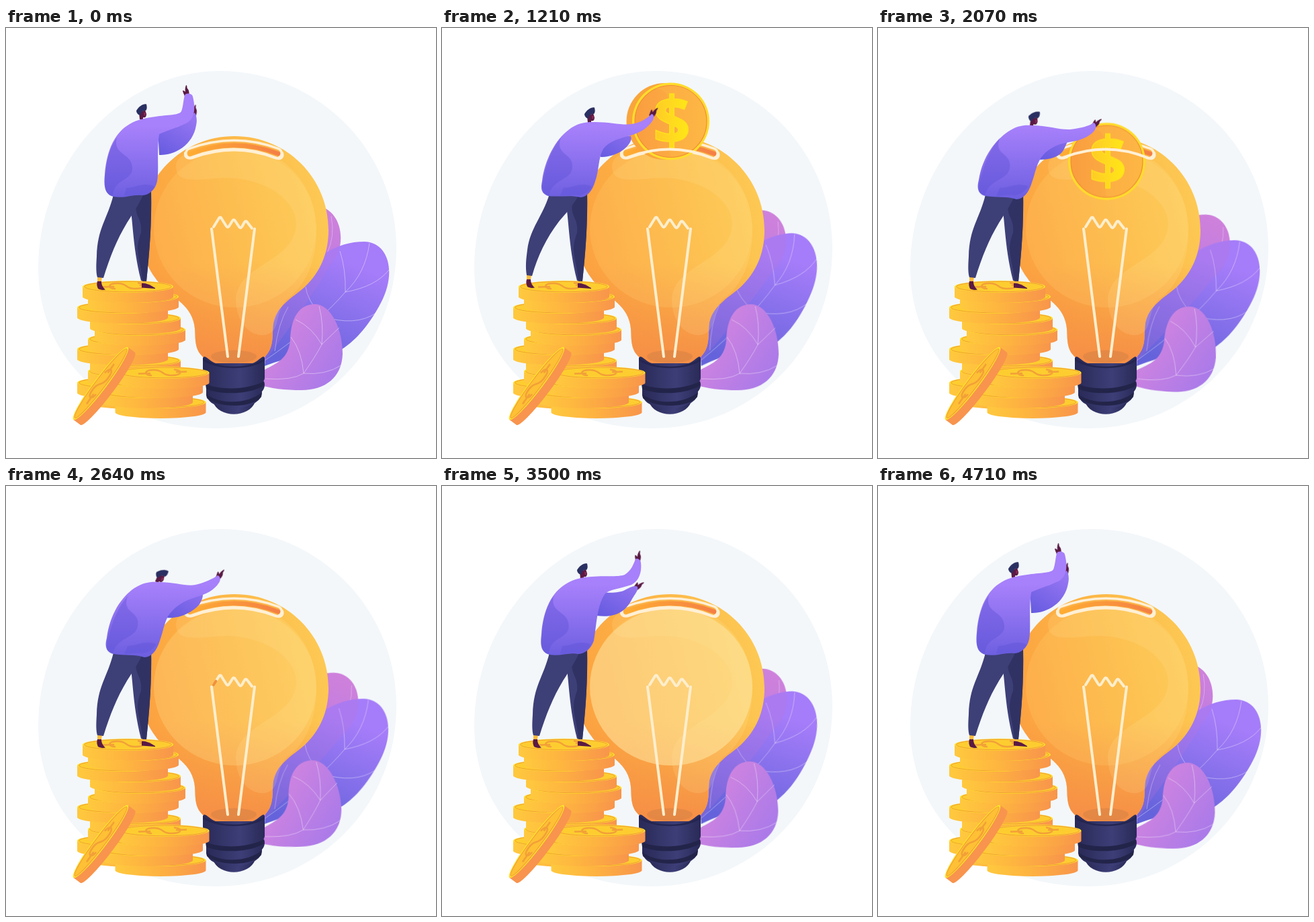
Write an HTML page that moves like this. It is 640 by 640 pixels and loops after 4.78 s.

```html
<!DOCTYPE html>
<html lang="en">
<head>
<meta charset="utf-8">
<title>Investing in an idea</title>
<style>
html, body { margin: 0; width: 100%; height: 100%; overflow: hidden; background: #fff; }
svg { display: block; width: 100vw; height: 100vh; }
svg * { animation: 4.78s linear infinite; }
.vein { fill: none; stroke: #fff; stroke-opacity: .4; stroke-width: 1; }
.wire { fill: none; stroke: #ffeecd; stroke-width: 4; stroke-linecap: round; stroke-linejoin: round; }
.skin { fill: #5a1a44; }

/* Leaves */
.big, .rear, .near { animation-timing-function: cubic-bezier(.37, 0, .63, 1); }
.big { transform-origin: 385px 495px; animation-name: big; animation-duration: 1.195s; animation-direction: alternate; }
.rear { transform-origin: 385px 495px; animation-name: rear; animation-duration: 2.39s; animation-direction: alternate; }
.near { transform-origin: 380px 530px; animation-name: near; animation-duration: 1.195s; animation-direction: alternate; animation-delay: -1.7925s; }
@keyframes big { to { transform: rotate(-5.1deg); } }
@keyframes rear { to { transform: rotate(8.6deg); } }
@keyframes near { from { transform: rotate(-3.4deg); } to { transform: rotate(3.4deg); } }

/* Inserted coin */
.drop { animation-name: drop; }
.rim { animation-name: rim; }
@keyframes drop {
  0%, 2.5% { transform: translateY(-76px); opacity: 0; animation-timing-function: cubic-bezier(.3, .3, .55, 1); }
  5% { opacity: 1; }
  14.5% { transform: none; }
  32.4% { transform: none; animation-timing-function: cubic-bezier(.37, 0, .63, 1); }
  47.5% { opacity: 1; }
  50.2% { transform: translateY(88px); }
  52.5%, 100% { transform: translateY(88px); opacity: 0; }
}
@keyframes rim {
  0%, 32.4% { transform: translateX(-9px); }
  42%, 100% { transform: none; }
}

/* Light */
.glow { animation-name: glow; }
.spark { stroke: #f0913a; stroke-dasharray: 10 200; animation-name: spark; }
@keyframes glow {
  0%, 51% { opacity: .03; }
  55.2% { opacity: .14; }
  66%, 75% { opacity: .46; }
  92%, 100% { opacity: .03; }
}
@keyframes spark {
  0%, 53% { stroke-dashoffset: 10; opacity: 0; }
  53.1% { stroke-dashoffset: 10; opacity: 1; }
  55.2% { stroke-dashoffset: 4; opacity: 1; }
  64% { stroke-dashoffset: -92; opacity: 1; }
  64.1%, 100% { stroke-dashoffset: -92; opacity: 0; }
}

/* Man */
.body { animation-name: body; }
.arm { animation-name: arm; }
.shade { transform-origin: 0 250px; animation-name: shade; }
.head { animation-name: head; }
.hand { animation-name: hand; }
.hand2 { animation-name: hand2; }
.leg { animation-name: leg; }
.foot { animation-name: foot; }
@keyframes body {
  0%, 100% { d: path("M160 251C148 248 145 238 147 218C150 180 163 155 184 143C196 136 208 134 222 132C240 129 258 130 261 124C264 116 264 106 266 100C268 96 277 97 278 102C283 122 280 136 268 142C250 150 236 154 228 158C224 185 228 210 225 228C222 242 212 249 202 249C190 247 175 254 160 251Z"); animation-timing-function: ease-in-out; }
  14% { d: path("M158 250C147 246 147 238 149 228C153 195 170 165 188 152C200 142 212 140 224 140C245 139 268 145 281 143C294 140 303 130 309 124C312 124 314 128 312 134C303 150 290 156 276 160C258 165 248 170 240 180C232 195 234 212 228 228C224 242 216 252 206 252C192 248 174 252 158 250Z"); }
  25.3%, 31% { d: path("M158 250C147 246 147 238 149 228C153 195 170 165 188 152C200 142 212 140 224 140C245 139 268 145 282 143C296 141 306 134 312 128C315 128 316 132 314 137C305 151 292 157 277 161C258 166 248 170 240 180C232 195 234 212 228 228C224 242 216 252 206 252C192 248 174 252 158 250Z"); animation-timing-function: ease-in-out; }
  43.3%, 46% { d: path("M160 250C148 247 147 238 150 226C156 190 175 167 194 154C206 146 216 144 230 145C252 145 272 152 286 151C302 149 314 146 321 141C325 142 325 149 322 153C314 163 298 168 284 170C264 173 250 182 242 194C235 206 234 216 229 230C224 246 216 255 206 255C192 250 176 253 160 250Z"); animation-timing-function: ease-in; }
  55.2% { d: path("M160 250C148 247 147 238 150 226C155 190 172 165 191 152C204 144 214 142 228 143C250 143 270 150 282 147C296 144 308 138 315 133C319 134 320 140 317 144C310 155 298 161 284 165C264 171 250 180 241 194C235 206 234 216 229 230C224 246 216 255 206 255C192 250 176 253 160 250Z"); }
  73.2% { d: path("M160 251C148 248 146 238 148 222C150 184 164 158 184 146C197 138 208 136 222 135C240 133 262 136 272 132C282 126 285 116 288 109C290 106 296 110 296 114C298 130 292 142 282 147C264 153 250 154 243 160C230 178 230 210 226 230C222 243 212 250 202 250C190 247 175 254 160 251Z"); animation-timing-function: ease-out; }
}
@keyframes arm {
  0%, 100% { d: path("M226 150L228 189C250 190 278 175 283 145C285 135 283 130 281 126C276 128 270 140 262 144C250 150 238 152 226 150Z"); animation-timing-function: ease-in-out; }
  14%, 31% { d: path("M230 158L236 192C254 192 272 184 280 170C282 166 282 163 281 161C276 160 268 160 260 160C250 160 240 158 230 158Z"); animation-timing-function: ease-in-out; }
  43.3%, 46% { d: path("M234 165L240 196C256 196 270 192 276 182C279 176 281 172 282 168C276 166 268 166 260 166C250 164 242 164 234 165Z"); animation-timing-function: ease-in; }
  55.2% { d: path("M234 160L239 196C258 198 278 188 288 176C291 171 293 166 293 162C284 160 272 160 262 162C250 164 242 162 234 160Z"); }
  73.2% { d: path("M230 155L230 193C255 196 272 190 283 168C288 160 292 156 291 150C287 147 278 152 272 155C262 160 240 160 230 155Z"); animation-timing-function: ease-out; }
}
@keyframes shade {
  0%, 100% { transform: none; animation-timing-function: ease-in-out; }
  14%, 31% { transform: skewX(-8deg); }
  43.3%, 55.2% { transform: skewX(-11deg); }
  73.2% { transform: skewX(-1deg); animation-timing-function: ease-out; }
}
@keyframes head {
  0%, 100% { transform: translate(203px, 127px); animation-timing-function: ease-in-out; }
  14%, 31% { transform: translate(221px, 132px); animation-timing-function: ease-in-out; }
  43.3%, 46% { transform: translate(232px, 137px) rotate(14deg); animation-timing-function: ease-in; }
  55.2% { transform: translate(230px, 136px) rotate(30deg); }
  73.2% { transform: translate(210px, 129px); animation-timing-function: ease-out; }
}
@keyframes hand {
  0%, 100% { transform: translate(269px, 98px); animation-timing-function: ease-in-out; }
  14% { transform: translate(310px, 125px) rotate(34deg); }
  25.3%, 31% { transform: translate(313px, 129px) rotate(42deg); animation-timing-function: ease-in-out; }
  43.3%, 46% { transform: translate(323px, 144px) rotate(52deg); animation-timing-function: ease-in; }
  55.2% { transform: translate(317px, 135px) rotate(40deg); }
  73.2% { transform: translate(292px, 109px) rotate(14deg); animation-timing-function: ease-out; }
}
@keyframes hand2 {
  0%, 100% { transform: translate(280px, 127px) rotate(12deg); animation-timing-function: ease-in-out; }
  14%, 31% { transform: translate(267px, 168px) rotate(40deg); }
  43.3%, 55.2% { transform: translate(268px, 172px) rotate(50deg); }
  73.2% { transform: translate(290px, 151px) rotate(58deg); animation-timing-function: ease-out; }
}
@keyframes leg {
  0%, 36%, 100% { d: path("M160 248C151 285 136 297 135 340C134 355 134 365 136 371L145 372C155 340 165 315 180 290C193 270 202 255 205 246Z"); animation-timing-function: ease-in-out; }
  15.5% { d: path("M157 247C145 268 118 288 111 318C106 340 104 350 104 356L112 358C128 334 142 308 160 288C178 270 193 257 203 246Z"); animation-timing-function: ease-in-out; }
  25.3% { d: path("M160 247C150 280 131 298 127 330C125 345 124 355 126 368L134 369C142 340 155 313 174 288C192 268 200 256 205 246Z"); animation-timing-function: ease-out; }
}
@keyframes foot {
  0%, 36%, 100% { transform: translate(140px, 373px); animation-timing-function: ease-in-out; }
  15.5% { transform: translate(107px, 359px) rotate(10deg); animation-timing-function: ease-in-out; }
  25.3% { transform: translate(130px, 370px); animation-timing-function: ease-out; }
}
</style>
</head>
<body>
<svg viewBox="0 0 640 640">
<defs>
  <linearGradient id="gSide"><stop stop-color="#ffc93e"/><stop offset=".45" stop-color="#feb440"/><stop offset="1" stop-color="#f8954b"/></linearGradient>
  <linearGradient id="gBig" gradientUnits="userSpaceOnUse" x1="510" y1="330" x2="440" y2="500"><stop offset=".1" stop-color="#a57cf9"/><stop offset="1" stop-color="#6563db"/></linearGradient>
  <linearGradient id="gPink" x1=".2" y1=".2" x2="1" y2=".7"><stop stop-color="#d585de"/><stop offset="1" stop-color="#aa7ae9"/></linearGradient>
  <linearGradient id="gRear" gradientUnits="userSpaceOnUse" x1="480" y1="270" x2="430" y2="440"><stop stop-color="#d284de"/><stop offset="1" stop-color="#aa7ae9"/></linearGradient>
  <linearGradient id="gBulb" x1="0" y1=".6" x2="1" y2=".3"><stop offset=".05" stop-color="#fca241"/><stop offset=".5" stop-color="#fcb545"/><stop offset="1" stop-color="#fdc954"/></linearGradient>
  <linearGradient id="gNeck" gradientUnits="userSpaceOnUse" x1="0" y1="350" x2="0" y2="500"><stop stop-color="#f58c46" stop-opacity="0"/><stop offset="1" stop-color="#f58c46" stop-opacity=".95"/></linearGradient>
  <linearGradient id="gBase"><stop stop-color="#292a57"/><stop offset=".6" stop-color="#3d3e77"/><stop offset="1" stop-color="#292a57"/></linearGradient>
  <linearGradient id="gSlot"><stop stop-color="#ffac32"/><stop offset="1" stop-color="#f47f45"/></linearGradient>
  <linearGradient id="gFace"><stop stop-color="#fa9d40"/><stop offset="1" stop-color="#fdb844"/></linearGradient>
  <linearGradient id="gSign"><stop stop-color="#ffc928"/><stop offset="1" stop-color="#ffe916"/></linearGradient>
  <linearGradient id="gBody" gradientUnits="userSpaceOnUse" x1="0" y1="135" x2="0" y2="255"><stop offset=".1" stop-color="#a780fb"/><stop offset="1" stop-color="#6c5fe0"/></linearGradient>
  <linearGradient id="gArm" gradientUnits="userSpaceOnUse" x1="275" y1="135" x2="240" y2="195"><stop stop-color="#9575f2"/><stop offset="1" stop-color="#665be0"/></linearGradient>
  <g id="coin">
    <path d="M-67.5 0V15A67.5 9 0 0 0 67.5 15V0Z" fill="url(#gSide)"/>
    <ellipse rx="67.5" ry="9" fill="#ffe02a"/>
    <ellipse rx="65" ry="7.8" fill="#fdcd30" stroke="#ef963c" stroke-width=".9"/>
  </g>
  <path id="sign" d="M-36 1.500L-20 1M20 -1L34 -1.500M-18 4C-30 3 -28 -4 -14 -4C2 -4 -4 4 12 4C28 4 30 -3 17 -4.500" fill="none" stroke="#f2a038" stroke-width="2.6" stroke-linecap="round"/>
  <path id="rearLeaf" d="M385 497C350 400 400 262 462 265C500 268 511 325 481 355C455 400 430 435 385 497Z"/>
  <path id="bulb" d="M340 161C418 161 480 223 480 301C480 336 467 364 445 385C426 402 401 414 397.500 442C396 464 400 484 372 499H308C285 488 282 476 281.500 456C282 416 254 406 233 385C211 362 200 335 200 301C200 223 262 161 340 161Z"/>
  <path id="zigzag" d="M309 296L317 283Q319 280 321 284L328 295Q330 298 332 295L337 287Q339 284 341 287L347 296Q349 299 351 296L355 289Q357 286 359 289L366 298"/>
  <path id="palm" d="M-3 4C-4 0 -6 -2 -6 -5C-4 -5 -3 -4 -2 -3C-3 -7 -2 -10 -1 -13C1 -13 0 -9 1 -8C4 -5 4 0 3 4Z"/>
</defs>

<path d="M318 64C463 64 581 181 581 328C581 478 462 596 312 596C165 596 48 500 48 357C48 200 172 64 318 64Z" fill="#f3f7fa"/>

<!-- Leaves -->
<use class="rear" href="#rearLeaf" fill="url(#gRear)"/>
<g class="rear"><path class="vein" d="M484 280Q490 310 478 335"/></g>
<g class="big">
  <path d="M385 503C392 415 450 318 533 318C571 319 581 366 558 409C542 440 521 465 500 478C465 482 424 488 385 503Z" fill="url(#gBig)"/>
  <path class="vein" d="M385 495Q465 440 505 393Q535 365 541 320M505 393Q506 360 497 332M505 393Q550 385 570 360M470 429Q520 445 551 424M470 429Q448 405 446 385M400 481Q405 440 420 415"/>
</g>
<use class="rear" href="#rearLeaf" fill="#c476cf" opacity=".2"/>
<g class="near">
  <path d="M372 530C368 500 419 511 423 465C424 430 437 411 460 411C485 412 501 450 501 485C500 520 475 539 440 539C415 539 396 537 372 530Z" fill="url(#gPink)"/>
  <path class="vein" d="M386 522Q425 525 443 514Q460 490 470 471Q473 440 466 414M470 471L496 446M470 471Q455 445 431 434M443 514Q440 480 424 460M443 514Q475 517 499 502"/>
</g>

<!-- Bulb -->
<use href="#bulb" fill="url(#gBulb)"/>
<use href="#bulb" fill="url(#gNeck)"/>
<ellipse cx="341" cy="298" rx="121" ry="118" fill="#ffe27c" opacity=".13"/>
<path d="M253 205C252 235 290 224 330 223C385 224 431 255 432 290C431 350 344 350 342 405C343 440 364 459 385 457C411 452 398 425 418 404C446 385 463 345 462 300C461 225 405 176 340 175C290 175 254 185 253 205Z" fill="#ffeaa8" opacity=".15"/>
<ellipse class="glow" cx="341" cy="299" rx="121" ry="117" fill="#ffeaae"/>
<ellipse cx="339" cy="489" rx="34" ry="9.500" fill="#c97a45" opacity=".4"/>
<path class="wire" d="M306 299L330 489M370 299L346 489"/>
<use class="wire" href="#zigzag"/>
<use class="wire spark" href="#zigzag"/>

<!-- Screw base -->
<path d="M308 556C316 581 362 581 371 556Z" fill="url(#gBase)"/>
<path d="M298 528V546C300 556 309 561 320 564C345 570 374 562 380 548L381 541C385 537 386 530 384 526Z" fill="url(#gBase)"/>
<path d="M298 545C320 562 362 559 381 542L380 549C366 566 318 566 299 551Z" fill="#232449"/>
<path d="M293 491C296 485 304 497 312 499H367C376 496 383 485 385 491V521C384 526 382 529 377 531C350 539 316 538 298 531C293 528 293 526 293 520Z" fill="url(#gBase)"/>
<path d="M297 530C322 540 360 538 384 526L383 533C360 546 318 546 298 537Z" fill="#232449"/>
<path d="M293 491C315 508 365 508 385 491V495C364 510 315 510 293 495Z" fill="#242550"/>

<!-- Slot -->
<g fill="none" stroke-linecap="round">
  <path d="M275 186.500Q340 162.500 403 186.500" stroke="#fff0d6" stroke-width="18"/>
  <path d="M275 186.500Q340 162.500 403 186.500" stroke="#fbb246" stroke-width="11"/>
  <path d="M274 187Q340 162 405 187" stroke="url(#gSlot)" stroke-width="6.500"/>
</g>
<g class="drop">
  <circle class="rim" cx="340.500" cy="139" r="57" fill="#f9a53c"/>
  <circle cx="340.500" cy="139" r="57.500" fill="#ffdc2c"/>
  <circle cx="340.500" cy="139" r="53.500" fill="url(#gFace)" stroke="#ef8c3a" stroke-width="1.200"/>
  <path d="M318 90C350 95 328 120 344 137C360 153 334 166 340 192C371 190 393 166 393 139C393 108 370 86 341 86Z" fill="#fdb445" opacity=".45"/>
  <text x="342" y="173" text-anchor="middle" font-family="'Open Sans', sans-serif" font-weight="700" font-size="98" fill="url(#gSign)" stroke="#ffe11c" stroke-width="1.500">$</text>
</g>
<path d="M267 186C266 193 271 195 278 192Q340 168.500 401 193C408 196 413 193 411 186" fill="none" stroke="#fff0d6" stroke-width="4" stroke-linecap="round"/>

<!-- Coins -->
<use href="#coin" x="187" y="543"/>
<use href="#coin" x="173.500" y="528"/>
<use href="#coin" x="189.500" y="511"/>
<use href="#coin" x="192.500" y="495"/>
<use href="#coin" x="173.500" y="478"/>
<use href="#coin" x="189.500" y="463"/>
<use href="#coin" x="199.500" y="449"/>
<use href="#coin" x="192.500" y="432"/>
<use href="#coin" x="173.500" y="416"/>
<use href="#coin" x="189.500" y="400"/>
<use href="#coin" x="181.500" y="385"/>
<use href="#sign" x="180" y="384"/>
<use href="#coin" x="230" y="557"/>
<use href="#coin" x="210.500" y="542"/>
<use href="#coin" x="225.500" y="527"/>
<use href="#coin" x="235" y="513"/>
<use href="#sign" x="234" y="513"/>
<g transform="translate(141 529) rotate(-53)">
  <path d="M-67.500 0V13A67.500 9 0 0 0 67.500 13V0Z" fill="#f8944d"/>
  <ellipse rx="67.500" ry="9.500" fill="#ffe02a"/>
  <ellipse rx="64" ry="7.500" fill="#fec034" stroke="#f0963c"/>
  <use href="#sign"/>
</g>

<!-- Man -->
<path d="M201 374H209L208 380H202Z" fill="#fdbb3c"/>
<path class="skin" d="M202 380C207 379 214 382 222 387V388L202 386.500Z"/>
<path d="M182 247C190 285 187 320 201 376L209 377C214 330 217 290 216 242Z" fill="#3d3f77"/>
<path d="M197 250C186 280 204 280 201 305C190 335 200 340 203 377H209C214 330 217 290 216 242Z" fill="#2d2f60" opacity=".8"/>
<g class="foot">
  <path d="M-4 -3L3 -2L2 4H-4Z" fill="#fdbb3c"/>
  <path class="skin" d="M-4 4H2C2 10 5 14 8 16.500C3 17.500 0 16.500 -3 15C-5 10 -5 8 -4 4Z"/>
</g>
<path class="leg" fill="#3d3f77"/>
<use class="hand2 skin" href="#palm"/>
<path class="arm" fill="url(#gArm)"/>
<g class="head">
  <path class="skin" d="M-4 9L-5 -1L4 -5L6 1C6 6 3 7 1 6V10Z"/>
  <path d="M2 -1C5 -2 6 2 3 4Z" fill="#8d2c57"/>
  <path d="M-9 -4C-5 -11 2 -15 6 -13.500C7 -9 7 -6 5 -4C1 -5 -2 -2 -3 3C-7 2 -9 -1 -9 -4Z" fill="#2a2f62"/>
</g>
<use class="hand skin" href="#palm"/>
<path class="body" fill="url(#gBody)"/>
<g class="shade" fill="#5d52d6" opacity=".42">
  <path d="M165 163C158 190 188 185 188 209C188 228 160 224 159 250C147 247 146 236 148 218C150 192 156 176 165 163Z"/>
  <path d="M179 238C190 239 205 228 221 236C216 247 207 249 201 249C190 247 180 252 176 249Z"/>
</g>
</svg>
</body>
</html>
```
